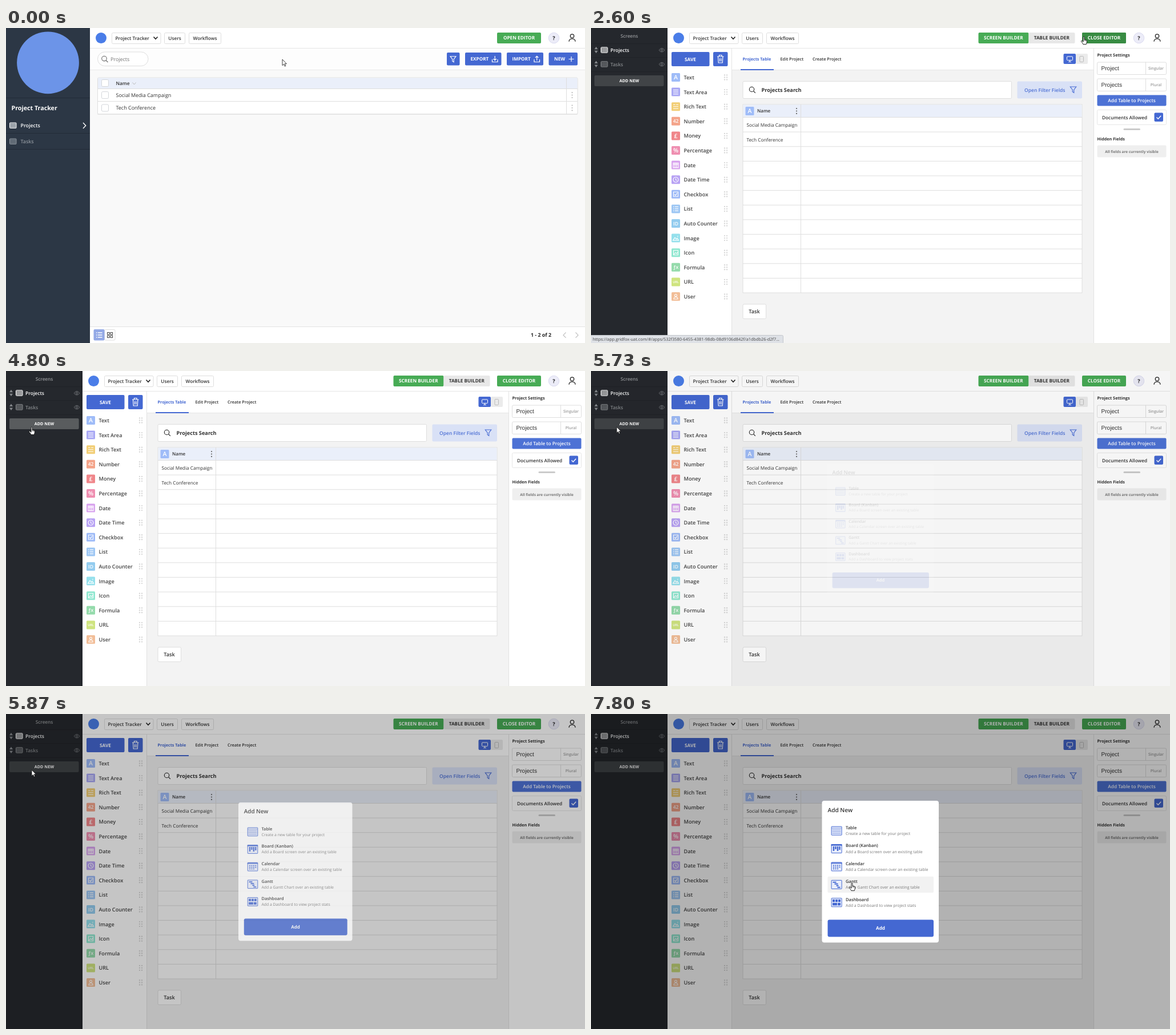
Write an HTML page that moves like this. It is 1014 px wide and 552 px high and loops after 8000 ms.

```html
<!DOCTYPE html>
<html lang="en">
<head>
<meta charset="utf-8">
<title>Project Tracker</title>
<style>
html, body { margin: 0; width: 100%; height: 100%; overflow: hidden; }
svg { display: block; width: 1014px; height: 552px; }
text { font-family: "Open Sans", "Noto Sans", sans-serif; text-rendering: geometricPrecision; }
</style>
</head>
<body>
<svg id="stage" viewBox="0 0 1014 552"></svg>
<script>
const BLUE = '#4468d2', INK = '#333', LINE = '#dedede', WHITE = '#fff';

// Shape helpers; text is placed by the vertical centre of its capitals.
const rect = (x, y, w, h, fill, stroke = 'none', r = 0, extra = '') =>
  `<rect x="${x}" y="${y}" width="${w}" height="${h}" rx="${r}" fill="${fill}" stroke="${stroke}" ${extra}/>`;
const circle = (x, y, r, fill, stroke = 'none', w = 1) =>
  `<circle cx="${x}" cy="${y}" r="${r}" fill="${fill}" stroke="${stroke}" stroke-width="${w}"/>`;
const path = (d, stroke, w = 1, fill = 'none') =>
  `<path d="${d}" stroke="${stroke}" stroke-width="${w}" fill="${fill}"/>`;
const text = (x, y, s, size, weight = 400, fill = INK, anchor = 'start', extra = '') =>
  `<text x="${x}" y="${y + size * .36}" font-size="${size}" font-weight="${weight}" fill="${fill}" text-anchor="${anchor}" ${extra}>${s}</text>`;
const mid = (x, y, s, size, weight, fill) => text(x, y, s, size, weight, fill, 'middle');
const group = (id, ...parts) => `<g id="${id}">${parts.join('')}</g>`;
const repeat = (n, f) => Array.from({ length: n }, (_, i) => f(i)).join('');
const dots = (x, y, gap, fill, r = 1.1) => repeat(3, i => circle(x, y + (i - 1) * gap, r, fill));
const button = (x, w, label) => rect(x + .5, 8.5, w - 1, 19, WHITE, LINE, 2) + mid(x + w / 2, 17.7, label, 8.24, 600);
const lens = (x, y, r, color) => circle(x, y, r, 'none', color, 1.1) + path(`M${x + r * .7} ${y + r * .7}l3.4 3.4`, color, 1.2);
const funnel = (x, y, s, color) =>
  path(`M${x - 5 * s} ${y - 4.8 * s}h${10 * s}l${-3.8 * s} ${5 * s}v${5 * s}l${-2.4 * s} ${-1.6 * s}v${-3.4 * s}z`, color, 1.1);
const tableIcon = (x, y, color, fill) =>
  rect(x + .5, y + .5, 11.5, 9.5, fill, color, 1) + path(`M${x} ${y + 3}h12M${x + 1} ${y + 5.5}h10.500M${x + 1} ${y + 7.8}h10.500`, color, .6);

// The part of the top bar shared by both screens, shifted with the side bar.
const topBar = (left, dx, hoverId, label) =>
  rect(left, 0, 1014 - left, 35, WHITE) + path(`M${left} 35.500H1014`, '#e6e6e6') +
  circle(166.5 + dx, 17.5, 9.5, '#4a7de8') +
  rect(185.5 + dx, 8.5, 85.5, 19, WHITE, LINE, 2) +
  text(191.5 + dx, 17.7, 'Project Tracker', 8.24, 600) +
  path(`M${258.5 + dx} 15.500l3.500 3.800 3.500-3.800`, '#222', 1.6) +
  button(277 + dx, 37, 'Users') + button(320 + dx, 57, 'Workflows') +
  rect(860, 8, 77, 19, '#47ab55', 'none', 2) +
  rect(860, 8, 77, 19, '#388c43', 'none', 2, `id="${hoverId}"`) +
  mid(898.5, 17.3, label, 8.24, 700, WHITE) +
  circle(959.5, 17.5, 9.2, '#ececf8', '#dadaf0') + mid(959.5, 17.5, '?', 9.2, 700, '#222') +
  circle(991.5, 14, 3.2, 'none', '#222', 1.3) + path('M986 23.800c0-6.600 11-6.600 11 0', '#222', 1.3);

function listScreen() {
  const blueButton = (x, w, label, icon) =>
    rect(x, 43, w, 22.5, BLUE, 'none', 2) + text(x + 9.5, 54.3, label, 8.2, 700, WHITE) + path(icon, WHITE, 1.2);
  const check = y => rect(167.5, y + .5, 12, 12, WHITE, '#d3d6da', 2);
  const row = (y, name) => check(y - 6.5) + text(192.5, y, name, 8.97) + dots(991.5, y, 4.4, '#bbb') +
    path(`M160 ${y + 11}H1001`, LINE);
  return rect(147, 0, 867, 552, '#f9f9f9') + rect(0, 0, 147, 552, '#2c3745') +
    circle(73.5, 60.8, 54.4, '#6c94e8') +
    path('M0 122.500H147M0 184.500H147M0 212.500H147', '#222c38') +
    text(9.5, 140, 'Project Tracker', 10.7, 700, WHITE) +
    tableIcon(6, 165.5, WHITE, '#7c858f') + text(25.5, 171, 'Projects', 8.87, 600, WHITE) +
    path('M135 166l4.700 5-4.700 5', WHITE, 1.4) +
    tableIcon(6, 193.5, '#8d949c', '#535e6a') + text(25.5, 199, 'Tasks', 8.8, 600, '#8d949c') +
    rect(147, 35, 867, 38, '#fdfdfd') + path('M147 73.500H1014', '#e8e8e8') +
    topBar(147, 0, 'openHover', 'OPEN EDITOR') +
    rect(160.5, 42, 88.5, 24.5, WHITE, LINE, 12.3) + lens(172, 53.6, 4.3, '#666') +
    text(183, 54.5, 'Projects', 8.97, 400, '#757575') +
    rect(772, 43, 22.5, 22.5, BLUE, 'none', 2) + funnel(783, 54.5, 1, WHITE) +
    blueButton(804, 63.5, 'EXPORT', 'M851.500 55v4.500h9.500v-4.500M856.200 49v7.500M853.500 54l2.700 2.700 2.700-2.700') +
    blueButton(877, 64, 'IMPORT', 'M925 55v4.500h9.500v-4.500M929.700 57v-7.500M927 52l2.700-2.700 2.700 2.700') +
    blueButton(950.5, 50.5, 'NEW', 'M985.500 54.500h9M990 50v9') +
    rect(160.5, 87, 840.5, 64, WHITE, LINE, 2) + rect(161, 87.5, 839.5, 18.5, '#eaeffa') +
    path('M160 106.500H1001M981.500 87V151', LINE) + check(90) +
    text(192.5, 96.8, 'Name', 8.35, 600) + path('M221.500 95.500l3 3.500 3-3.500', '#bbb') +
    row(117.6, 'Social Media Campaign') + row(140, 'Tech Conference') +
    rect(147, 523, 867, 29, WHITE) + path('M147 523.500H1014', '#e3e3e3') +
    rect(172.5, 528.5, 18.5, 18.5, WHITE, LINE, 2) + rect(153.5, 528, 19, 19.5, '#93a9e6', 'none', 2) +
    path('M158 534h1.500M161 534h7.500M158 538h1.500M161 538h7.500M158 542h1.500M161 542h7.500', WHITE, 1.3) +
    repeat(4, i => rect(177.5 + i % 2 * 5.5, 533.5 + (i >> 1) * 5.5, 3.6, 3.6, 'none', '#444')) +
    text(919, 538, '1 - 2 of 2', 8.87, 700, '#222') +
    path('M980.500 533.500l-4.500 4.700 4.500 4.700M997.500 533.500l4.500 4.700-4.500 4.700', '#c0c0c0', 1.2);
}

// name, tile colour, then either a short label or a path starting with M (tile is 15 x 15)
const fields = [
  ['Text', '#9fbcf8', 'A'], ['Text Area', '#a9a8f4', 'M3 4h9M3 7.500h9M3 11h9'],
  ['Rich Text', '#f2ce76', 'M8 4h4M3 7.500h9M3 11h9M3 4h3.500'], ['Number', '#f4a48a', '42'],
  ['Money', '#f0868a', '£'], ['Percentage', '#ef8fb1', '%'],
  ['Date', '#d8a3ee', 'M3 4h9v8h-9zM3 6.500h9M6 4v8M9 4v8'],
  ['Date Time', '#b8a2f4', 'M7.500 3a4.500 4.500 0 1 0 .01 0M7.500 5v3l2 1'],
  ['Checkbox', '#9dbaf7', 'M3.500 3.500h8v8h-8zM5 7.500l2 2 3-4'],
  ['List', '#9ec7f4', 'M3 4h1.500M6 4h6M3 7.500h1.500M6 7.500h6M3 11h1.500M6 11h6'],
  ['Auto Counter', '#93ccef', 'ID'], ['Image', '#95e0ec', 'M2.500 11.500l3.500-5 2.500 3 1.500-2 2.500 4zM10 4.500h1.500'],
  ['Icon', '#90e7d0', 'M3.500 3.500h8v8h-8zM4 10.500l3-3 2 1.500 2-2'], ['Formula', '#95dbac', 'ƒx'],
  ['URL', '#cfe47f', 'URL'], ['User', '#f2be98', 'M7.500 3.500a2 2 0 1 0 .01 0M4 12c0-5 7-5 7 0z']
];

function tile(x, y, color, glyph) {
  const art = glyph.startsWith('M') ? path(glyph, WHITE, 1.1)
    : mid(7.5, 7.6, glyph, [0, 10.5, 8.5, 5.5][glyph.length], 600, WHITE);
  return `<g transform="translate(${x} ${y})">${rect(0, 0, 15, 15, color, 'none', 1.5) + art}</g>`;
}

function editorScreen() {
  const sideRow = (y, name, color, fill) =>
    path(`M6 ${y - 1.5}l3-4.500 3 4.500zM6 ${y + 1}l3 4.500 3-4.500z`, 'none', 0, '#85888c') +
    tableIcon(17, y - 5.5, color, fill) + text(34, y, name, 8.5, 600, color) +
    path(`M119 ${y}q5-6.500 10 0q-5 6.500-10 0z`, '#75787c', .9) + circle(124, y, 1.6, 'none', '#75787c', .9);
  const input = (y, value, hint) => rect(886.5, y + .5, 121, 21.5, WHITE, LINE, 2) + path(`M971.500 ${y}v22`, LINE) +
    text(893.5, y + 11.2, value, 10.1, 400, INK, 'start', 'style="font-family:\'Liberation Sans\',Arial,sans-serif"') +
    mid(989.5, y + 11.3, hint, 6.9, 600, '#999');
  const field = ([name, color, glyph], i) => {
    const y = 86.5 + i * 25.6;
    return tile(141, y - 7.5, color, glyph) + text(162.5, y + .2, name, 9.15, 600, '#444') +
      dots(234, y, 4, '#d8d8d8', 1.2) + dots(238, y, 4, '#d8d8d8', 1.2);
  };
  return rect(134, 0, 880, 552, WHITE) + rect(246, 73, 634, 479, '#f3f3f3') +
    rect(0, 0, 134, 552, '#25282d') + path('M0 27.500H134M0 51.500H134M0 76.500H134', '#202227') +
    mid(67, 14, 'Screens', 8.24, 600, '#96989b') +
    sideRow(38.8, 'Projects', WHITE, '#77797c') + sideRow(63.6, 'Tasks', '#85888b', '#45484c') +
    rect(6, 83, 121.5, 19, '#414447', 'none', 2) + rect(6, 83, 121.5, 19, '#595c5e', 'none', 2, 'id="addHover"') +
    mid(67, 92.8, 'ADD NEW', 7.2, 700, WHITE) +
    topBar(134, -13, 'closeHover', 'CLOSE EDITOR') +
    rect(678.5, 8, 88, 19, '#47ab55', 'none', 2) + mid(722.3, 17.3, 'SCREEN BUILDER', 8.24, 700, WHITE) +
    rect(766.5, 8, 81, 19, '#e8e8e8', 'none', 2) + mid(806.8, 17.3, 'TABLE BUILDER', 8.24, 700, INK) +
    path('M246.500 35V552M880.500 35V552', '#e3e3e3') + path('M246 73.500H880', '#e6e6e6') +
    rect(141, 42, 66.5, 25, BLUE, 'none', 2) + mid(174, 54.6, 'SAVE', 8.3, 700, WHITE) +
    rect(214, 42, 25.5, 25, BLUE, 'none', 2) +
    path('M221 50h11.500M224.500 50v-2.500h4.500v2.500M222.500 50.500l.7 10.500h7l.7-10.500M225.500 53v5.500M228 53v5.500', WHITE, 1.2) +
    fields.map(field).join('') +
    text(265.5, 54.2, 'Projects Table', 7.2, 700, BLUE) + text(331.5, 54.2, 'Edit Project', 7.4, 600) +
    text(388, 54.2, 'Create Project', 7.4, 600) + rect(262, 72, 58, 2, BLUE) +
    rect(849, 45, 21, 18, '#ebebeb', 'none', 2) + rect(856, 49.5, 6.5, 10, 'none', '#bbb', 1) +
    rect(827.5, 45, 21.5, 18, BLUE, 'none', 2) + rect(833.5, 50, 10, 6.5, 'none', WHITE, 1) + path('M838.500 56.500v2.500M836 59.300h5', WHITE) +
    rect(266, 93.5, 470.5, 30, WHITE, LINE, 2) + lens(281.5, 107.5, 4.2, '#222') +
    text(298.5, 108.5, 'Projects Search', 9.2, 700) +
    rect(746.5, 93.5, 113.5, 30, '#d9e1f6', 'none', 2) + text(759, 108.5, 'Open Filter Fields', 8.5, 600, '#4c6fd4') +
    funnel(844.5, 108, 1.05, BLUE) +
    rect(266, 134, 594, 330, WHITE, LINE) + rect(266.5, 134.5, 593, 22, '#eaeffa') +
    repeat(12, i => path(`M266 ${156.5 + i * 25.63}H860`, LINE)) + path('M367.500 134V464', LINE) +
    tile(270.5, 138, '#9fbcf8', 'A') + text(291, 145.6, 'Name', 8, 600) + dots(360, 145.5, 4.4, '#666') +
    text(272.5, 170, 'Social Media Campaign', 8.24) + text(272.5, 195.7, 'Tech Conference', 8.24) +
    rect(266, 484, 40.5, 25.5, WHITE, LINE, 2) + mid(286, 497, 'Task', 9.15, 600, INK) +
    text(886.5, 47, 'Project Settings', 7.3, 700) + input(59.5, 'Project', 'Singular') + input(88.5, 'Projects', 'Plural') +
    rect(886.5, 117.5, 121, 19, '#4d72d5', 'none', 2) + mid(947, 127.3, 'Add Table to Projects', 8.25, 600, WHITE) +
    rect(886.5, 143.5, 121, 26, WHITE, '#e6e6e6', 2) + text(895, 156.7, 'Documents Allowed', 8.24, 600) +
    rect(986.5, 148.5, 15.5, 15.5, BLUE, 'none', 2) + path('M990.500 156.500l2.700 2.700 5-5.500', WHITE, 1.4) +
    rect(932.5, 176, 29.5, 3, '#cbcbcb', 'none', 1.5) +
    text(886.5, 194.4, 'Hidden Fields', 7.2, 700) +
    rect(886.5, 205.5, 121, 21, '#efefef', 'none', 2) + mid(947, 216.3, 'All fields are currently visible', 6.45, 700, '#777');
}

const options = [
  ['Table', 'Create a new table for your project', 'M1 3.500h17M2 6.500h15M2 9.500h15M2 12.500h15'],
  ['Board (Kanban)', 'Add a Board screen over an existing table', 'M0 1.500h19M4.500 4v8M8 4v5M11.500 4v8M15 4v6'],
  ['Calendar', 'Add a Calendar screen over an existing table', 'M0 2h19M3.500 6h2M7 6h2M10.500 6h2M14 6h2M3.500 9h2M7 9h2M10.500 9h2M14 9h2M3.500 12h2M7 12h2M10.500 12h2'],
  ['Gantt', 'Add a Gantt Chart over an existing table', 'M3 4h6M6 7h6M9 10h4M11 13h5'],
  ['Dashboard', 'Add a Dashboard to view project stats', 'M2.500 5h4M7.500 5h4M12.500 5h4M2.500 11h8M11.500 11h5']
];

const optionRow = ([name, note, art], i) => {
  const y = 204.6 + i * 31.4, bold = [.7, 2.4, 1.7, 2, 4.4][i];
  return rect(414.5, y - 14, 185.5, 28.5, '#f2f2f2', 'none', 2, `id="option${i}"`) +
    `<g transform="translate(420.500 ${y - 8})">${rect(.6, .6, 18, 15, '#e9eefb', BLUE, .5) + path(art, BLUE, bold)}</g>` +
    text(446, y - 5.4, name, 7.6, 600) + text(446, y + 5, note, 7, 400, '#777');
};

const stage = document.getElementById('stage');
stage.innerHTML =
  group('list', listScreen()) +
  group('editor', editorScreen()) +
  group('status', rect(-1, 538.5, 337.5, 15, '#dee1e6', '#c4c7cc', 2), text(3, 545.8, '', 7.36, 400, '#444', 'start', 'id="address"')) +
  rect(0, 0, 1014, 552, '#000', 'none', 0, 'id="shade"') +
  group('dialog', rect(404.5, 152, 204.5, 248.5, WHITE, 'none', 4), text(414.5, 168.3, 'Add New', 10.1, 600),
    options.map(optionRow).join(''),
    rect(414.5, 360.5, 185.5, 30, BLUE, 'none', 3), mid(507, 375.3, 'Add', 8.2, 700, WHITE)) +
  group('cursor',
    group('arrow', path('M0 0V10.600l2.500-2.300 1.700 3.800 1.700-.7-1.700-3.700H7.400z', '#111', .8, WHITE)),
    group('hand', path('M-1 1.300c0-1.500 2-1.500 2 0V5.300c2.200 0 4.300.5 4.300 2.200V10c0 1.500-.9 2-1 3.600h-5.500c0-2-2.900-3.400-3.400-5.300-.2-1.200 1.200-1.200 1.700-.5l1.900 1.500z', '#111', .9, WHITE),
      path('M1 5.500v2.300M2.600 5.700v2.200M4 6v2', '#111', .6)));

const part = Object.fromEntries([...stage.querySelectorAll('[id]')].map(e => [e.id, e]));
const fade = (id, v) => part[id].setAttribute('opacity', v);
const site = 'https://app.gridfox-uat.com/#/', project = '532f3580-6455-4381-98db-08d9106d842f';
const addresses = [`${site}builder/${project}/table/a1dbdb...`, `${site}apps/${project}/a1dbdb26-d2f7...`];

// start, duration, from x, y, to x, y, bend of the vertical part
const moves = [
  [467, 1000, 484, 55, 863, 15, 1],
  [3200, 1067, 863, 15, 47, 98, 5.3],
  [6667, 950, 45, 98, 457, 296, 1]
];

function draw(now) {
  const t = Math.floor(now % 8000 * .015 + .06) / .015;
  const ramp = (start, length) => Math.min(1, Math.max(0, (t - start) / length));
  const within = (a, b) => t > a && t < b;

  fade('editor', ramp(2200, 400));
  fade('openHover', ramp(1400, 333));
  fade('closeHover', 1 - ramp(3267, 300));
  fade('addHover', ramp(4200, 333) - ramp(5600, 133));
  fade('status', ramp(1800, 133) - ramp(3267, 200));
  part.address.textContent = addresses[t < 2500 ? 0 : 1];

  const k = ramp(5668, 294), open = k * k * (3 - 2 * k), scale = .9 + .1 * open;
  fade('shade', .3 * open);
  fade('dialog', open);
  part.dialog.setAttribute('transform', `translate(507 276) scale(${scale}) translate(-507 -276)`);
  const hovered = t < 7525 ? -1 : t < 7590 ? 2 : 3;
  options.forEach((_, i) => fade('option' + i, i === hovered ? 1 : 0));

  const [start, length, x0, y0, x1, y1, bend] = moves.findLast(m => t >= m[0]) || moves[0];
  const p = ramp(start, length);
  const nudge = start === 3200 ? 2 * ramp(4667, 133) : 0;
  part.cursor.setAttribute('transform', `translate(${x0 + (x1 - x0) * p - nudge} ${y0 + (y1 - y0) * p ** bend})`);
  const pointing = within(1460, 3450) || within(4190, 5660) || t > 7525;
  fade('hand', pointing ? 1 : 0);
  fade('arrow', pointing ? 0 : 1);
  requestAnimationFrame(draw);
}
requestAnimationFrame(draw);
</script>
</body>
</html>
```
